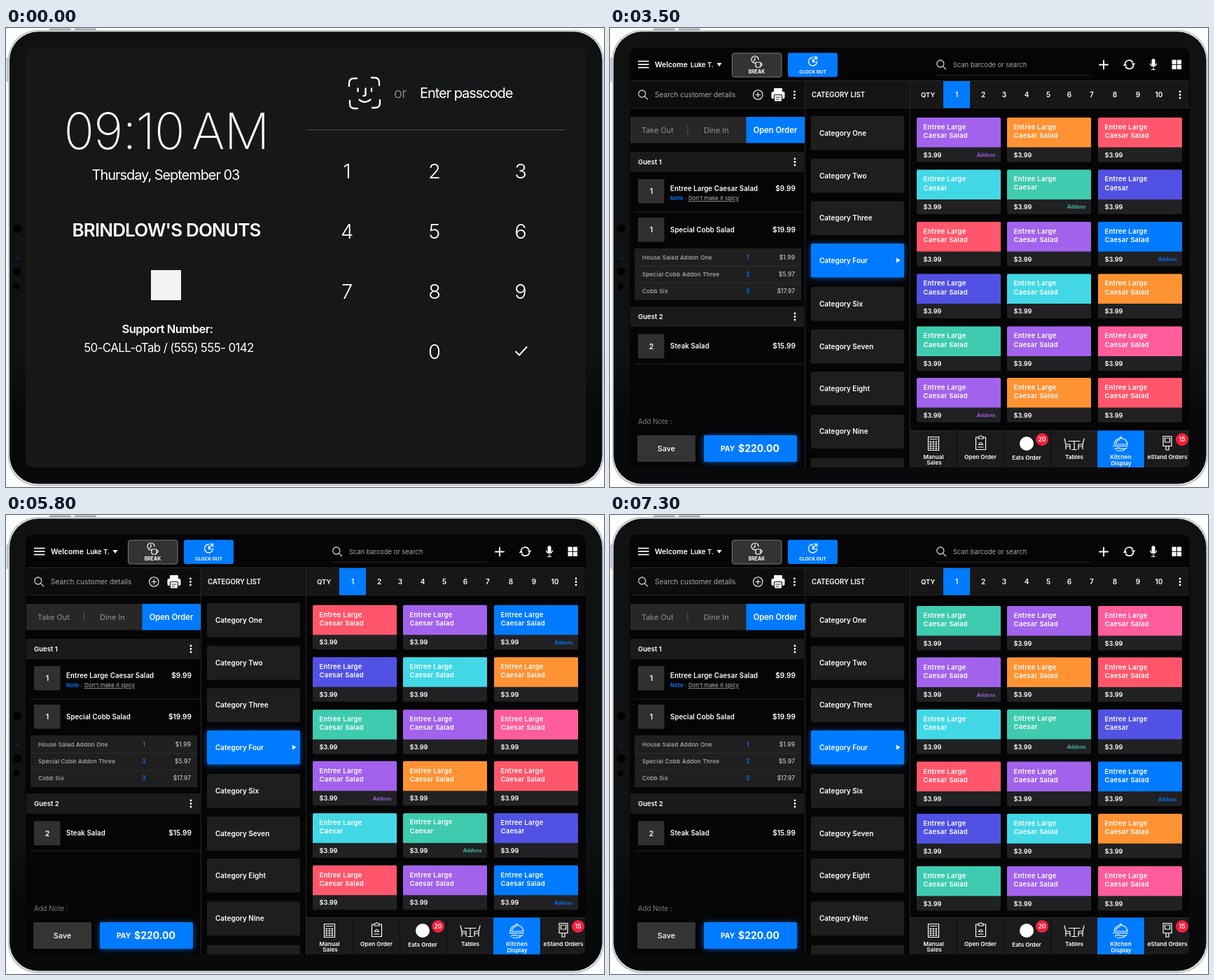
Recreate the animation shown at these times as an HTML page. Size 854x656 px, loop 8000 ms.

```html
<!DOCTYPE html>
<html lang="en">
<head>
<meta charset="utf-8">
<title>Point of sale tablet</title>
<style>
  html, body { margin: 0; width: 100%; height: 100%; overflow: hidden; background: #fff; }
  svg { display: block; width: 854px; height: 656px; font-family: Inter, "Open Sans", sans-serif; }
  text { white-space: pre; }
  .glow { filter: drop-shadow(0 1px 5px #007bff99); }
</style>
</head>
<body>
<svg id="stage" viewBox="0 0 854 656"></svg>
<script>
const BLUE = '#007bff', WHITE = '#fff';
const PURPLE = '#a262ec', ORANGE = '#ff9233', RED = '#ff566b', CYAN = '#43d8e6',
      TEAL = '#3ecbb0', INDIGO = '#5152e3', PINK = '#ff5c9b';

// Drawing helpers; text is placed by the middle of its capitals
const text = (x, y, size, weight, str, { fill = WHITE, anchor = 'start', ls = 0, more = '' } = {}) =>
  `<text x="${x}" y="${y + size * 0.364}" font-size="${size}" font-weight="${weight}" fill="${fill}" ` +
  `text-anchor="${anchor}" letter-spacing="${ls}" ${more}>${str}</text>`;
const mid = (x, y, size, weight, str, o) => text(x, y, size, weight, str, { anchor: 'middle', ...o });
const end = (x, y, size, weight, str, o) => text(x, y, size, weight, str, { anchor: 'end', ...o });
const rect = (x, y, w, h, fill, r = 0, more = '') =>
  `<rect x="${x}" y="${y}" width="${w}" height="${h}" rx="${r}" fill="${fill}" ${more}/>`;
const circle = (x, y, r, fill = WHITE) => `<circle cx="${x}" cy="${y}" r="${r}" fill="${fill}"/>`;
const line = (d, width = 1.5, stroke = WHITE) =>
  `<path d="${d}" fill="none" stroke="${stroke}" stroke-width="${width}" stroke-linecap="round" stroke-linejoin="round"/>`;
const shape = (d, fill = WHITE) => `<path d="${d}" fill="${fill}"/>`;
const each = (list, fn) => list.map(fn).join('');
const more = (x, y) => each([-4.5, 0, 4.5], d => circle(x, y + d, 1.4));
const lens = (x, y) => line(`M${x + 4.8} ${y - 1}a5 5 0 1 1-10 0a5 5 0 1 1 10 0M${x + 3.4} ${y + 2.6}l4.2 4.2`, 1.3, '#ccc');

function tablet() {
  return each([62, 98], x => rect(x, 0.5, 31, 4, '#a9adae', 1)) +
    rect(0.5, 42, 4, 35, '#c3c7c8', 1) +
    rect(3, 3, 850.5, 651.5, '#a4a9aa', 42) +
    rect(3.8, 3.8, 848.9, 649.5, '#e3e7e7', 41.5) +
    rect(5, 5.3, 846.5, 646.2, 'url(#bezel)', 41) +
    circle(16, 287, 6, '#020203') + circle(16, 348, 6, '#020203') + circle(15, 369, 4.5, '#020203') +
    line('M14 328.5l4 1', 1.5, '#10305c');
}

// Lock screen
const keyX = n => n ? [487, 612, 735][(n - 1) % 3] : 612;
const keyY = n => n ? 204 + 86 * Math.floor((n - 1) / 3) : 462;

function lockScreen() {
  const corners = each([0, 90, 180, 270], a =>
    `<g transform="rotate(${a} 512 93)">${line('M490 83v-4q0-7 7-7h4', 2.3)}</g>`);
  return rect(28, 28, 800, 600, '#161719', 10) +
    mid(229, 146.5, 72, 200, '09:10 AM', { ls: -0.8, more: 'word-spacing="-9"' }) +
    mid(228, 210, 20, 400, 'Thursday, September 03', { ls: -1.05 }) +
    mid(229, 289, 26, 600, "BRINDLOW'S DONUTS", { ls: -0.85 }) +
    rect(207, 346, 43, 43, '#f2f2f2') +
    mid(230.5, 429.5, 16.5, 600, 'Support Number:', { ls: -0.5 }) +
    mid(232.5, 457, 17, 400, '50-CALL-oTab / (555) 555- 0142', { ls: -0.65 }) +
    `<g id="prompt">${corners}` +
    line('M502.5 86.5v4M522 86.5v4M513.5 86.5v8.5q0 2-3 2M504.5 102.5q8 6.5 16 0', 2.3) +
    text(554, 93, 20, 300, 'or', { fill: '#98999b', ls: -0.5 }) +
    text(591, 92.5, 20, 400, 'Enter passcode', { ls: -1.05 }) + '</g>' +
    '<g id="dots"></g>' +
    rect(430, 145, 368.5, 1, '#4b4c4e') +
    '<circle id="press" r="36" fill="#313132"/>' +
    each([1, 2, 3, 4, 5, 6, 7, 8, 9, 0], n => mid(keyX(n), keyY(n), 29, 300, n)) +
    line('M728 462.5l5 5 10.5-11.5', 2);
}

// Order screen
function topBar() {
  return rect(29, 75, 798, 1, '#2a2a2b') +
    each([47.5, 52, 56.5], y => rect(40, y - 0.8, 15.5, 1.7, WHITE)) +
    text(64, 52, 10.4, 600, 'Welcome') + text(115, 52.5, 9.5, 600, 'Luke T.', { ls: -0.1 }) +
    shape('M152.5 50h7l-3.5 5z') +
    rect(174.5, 36, 70.5, 34, '#333334', 3, 'stroke="#7b7b7c"') +
    line('M207 50a5 5 0 1 1 5-5M207 42v3.5l-2 1.5M208 49h7v5q0 2-2 2h-3q-2 0-2-2zM215 50.5q3 0 2 2t-2 1', 1.2) +
    mid(209.5, 62.3, 7, 700, 'BREAK') +
    rect(254, 35.5, 71, 34.5, BLUE, 3) +
    line('M295.5 48a6 6 0 1 1-6-6M289.5 44.5v4h3.5M290 47l5.5-5.5M292 41.5h3.5v3.5', 1.3) +
    mid(289.5, 62.3, 6.5, 700, 'CLOCK OUT') +
    lens(472, 52) + text(490, 52.5, 9.3, 400, 'Scan barcode or search', { fill: '#a9a9aa' }) +
    rect(465, 67, 221, 1, '#252526') +
    line('M699 52.5h12M705 46.5v12', 1.9) +
    line('M735.5 51a6 6 0 0 1 11-2M747.5 53.5a6 6 0 0 1-11 2', 1.7) +
    shape('M744.5 50.5h6l-3 3.5zM732.5 54h6l-3-3.5z') +
    rect(773.5, 44, 5, 10, WHITE, 2.5) + line('M771.5 51a4.7 5 0 0 0 9 0M776 56.5v3M773.5 59.5h5', 1.2) +
    each([0, 1, 2, 3], i => rect(802.5 + i % 2 * 7.3, 45.5 + (i >> 1) * 7.3, 6.2, 6.2, WHITE, 0.5));
}

function secondBar() {
  const printer = rect(234, 86, 12, 5, WHITE, 1) + rect(230.5, 91, 19, 10, WHITE, 2) +
    rect(234.5, 95.5, 11, 9.5, WHITE, 1, 'stroke="#111" stroke-width="1.2"') +
    line('M237 99h6M237 102h4', 1, '#222');
  return rect(29, 76, 249, 38, '#0d0d0e') + rect(279, 76, 149, 38, '#141415') + rect(429, 76, 398, 38, '#171718') +
    rect(29, 114, 798, 1, '#222223') +
    lens(46, 95) + text(64, 95.5, 10.1, 400, 'Search customer details', { fill: '#a9a9aa' }) +
    line('M218 95.5a6.7 6.7 0 1 1-13.4 0a6.7 6.7 0 1 1 13.4 0M208 95.5h6.6M211.3 92.2v6.6', 1.1) +
    printer + more(263.5, 95.5) +
    text(288, 95.5, 9.7, 600, 'CATEGORY LIST') +
    text(444, 95.5, 9.6, 600, 'QTY') +
    rect(476, 76, 38, 38.5, BLUE) +
    each([495, 533, 563, 595, 626, 656, 688, 721, 754, 784], (x, i) => mid(x, 95.5, 10, 600, i + 1)) +
    more(814, 95.5);
}

function orderPanel() {
  const guest = (y, n) => rect(29, y, 248, 29, '#1a1a1b') + text(40, y + 14.5, 9.6, 600, 'Guest ' + n) + more(264, y + 14.5);
  const item = (y, n, name, price, dy = 0) => rect(40, y, 37.5, 34.5, '#303031', 1) +
    mid(59, y + 17.3, 10.5, 600, n) + text(86, y + 17.3 + dy, 9.7, 600, name, { ls: 0.08 }) +
    end(265, y + 17.3 + dy, 10.1, 600, price);
  const addons = [['House Salad Addon One', 1, '$1.99'], ['Special Cobb Addon Three', 3, '$5.97'], ['Cobb Six', 3, '$17.97']];
  return rect(29, 127, 166, 37.5, '#272728') + rect(194.5, 127, 83.5, 37.5, BLUE) +
    text(45, 146, 10.9, 400, 'Take Out', { fill: '#929293' }) + rect(110.5, 139, 1, 13, '#5b5b5c') +
    text(134, 146, 10.9, 400, 'Dine In', { fill: '#929293' }) +
    mid(236, 145.5, 11.2, 600, 'Open Order') +
    guest(177, 1) + item(216, 1, 'Entree Large Caesar Salad', '$9.99', -3.5) +
    text(86, 243.5, 8, 600, 'Note :', { fill: BLUE }) +
    text(112, 243.5, 8, 400, 'Don\'t make it spicy', { fill: '#bcbcbd', more: 'text-decoration="underline"' }) +
    rect(35, 262.5, 243, 1, '#222223') +
    item(271, 1, 'Special Cobb Salad', '$19.99') +
    rect(35, 315, 238, 74, '#1f1f20', 1) + rect(35, 340, 238, 1, '#2d2d2e') + rect(35, 364, 238, 1, '#2d2d2e') +
    each(addons, ([name, n, price], i) => {
      const y = 328.3 + 24 * i;
      return text(46, y, 8.2, 500, name, { fill: '#b4b4b5', ls: 0.22 }) + mid(197, y, 8.3, 600, n, { fill: BLUE }) +
        end(264, y, 8.3, 500, price, { fill: '#c4c4c5', ls: 0.1 });
    }) +
    guest(398, 2) + item(437.5, 2, 'Steak Salad', '$15.99') + rect(35, 479.5, 243, 1, '#222223') +
    text(40, 562, 9.7, 400, 'Add Note :', { fill: '#7d7d7e' }) +
    rect(39, 582, 83, 38, '#343435', 2) + mid(80.5, 601, 10.8, 500, 'Save') +
    rect(134, 582, 133, 38, BLUE, 2, 'class="glow"') +
    text(158, 601, 10.3, 700, 'PAY') + text(183, 601, 14, 700, '$220.00');
}

function categories() {
  const names = ['One', 'Two', 'Three', 'Four', 'Six', 'Seven', 'Eight', 'Nine', ''];
  const tops = [126, 187, 247.5, 308, 370, 431, 491, 552.5, 614.5];
  return each(names, (name, i) => {
    const on = name === 'Four';
    return rect(287, tops[i], 133, 48.5, on ? BLUE : '#1e1e1f', 2, on ? 'class="glow"' : '') +
      (name && text(299, tops[i] + 24, 10, 600, 'Category ' + name)) +
      (on ? shape('M409 328.5l5.5 3.5-5.5 3.5z') : '');
  });
}

// Five row styles repeat down the list: three colours and the column that has add-ons
const rows = [
  [PURPLE, ORANGE, RED, 0], [CYAN, TEAL, INDIGO, 1], [RED, PURPLE, BLUE, 2],
  [INDIGO, CYAN, ORANGE], [TEAL, PURPLE, PINK]
];
const rowTop = [0, 74.5, 149, 223.5, 298.5];

function tile(x, y, color, short, addons, lift) {
  const o = { ls: 0.25 };
  return rect(x, y, 120, 63.5, '#212123', 2) + shape(`M${x} ${y + 42.5}v-40.5q0-2 2-2h116q2 0 2 2v40.5z`, color) +
    text(x + 9.5, y + 13.5 - lift, 9.5, 600, 'Entree Large', o) +
    text(x + 9.5, y + 25.7 - lift, 9.5, 600, short ? 'Caesar' : 'Caesar Salad', o) +
    text(x + 9.5, y + 53.3, 9.1, 600, '$3.99') +
    (addons ? end(x + 112.5, y + 53.3, 7.2, 600, 'Addons', { fill: color, more: 'font-style="italic"' }) : '');
}

function products() {
  let out = '';
  for (let i = 0; i < 11; i++) {
    const k = i % 5, y = 128 + 372 * Math.floor(i / 5) + rowTop[k];
    out += each([438, 567, 697], (x, c) => tile(x, y, rows[k][c], k === 1, rows[k][3] === c, k === 1 && c === 1 ? 0.8 : 0));
  }
  return `<g clip-path="url(#list)"><g id="products">${out}</g></g>`;
}

function navBar() {
  const label = (x, y, str) => mid(x, y, 8.2, 600, str);
  const badge = (x, n) => circle(x, 588, 9, '#f3203a') + mid(x, 588, 8.5, 600, n);
  let keys = '';
  for (let i = 0; i < 12; i++) keys += rect(456.5 + i % 3 * 4, 590.5 + Math.floor(i / 3) * 3.1, 2.6, 1.9, WHITE);
  return rect(429, 575, 398, 53, '#1b1b1d') + rect(429, 575, 398, 1, '#2b2b2c') +
    each([495, 562, 629, 763], x => rect(x, 576, 1, 52, '#0c0c0d')) +
    rect(696, 575.5, 67, 53, BLUE) +
    line('M454.5 584.5h15v19h-15zM457 587.5h10', 1.2) + keys +
    label(462, 613, 'Manual') + label(463, 621.5, 'Sales') +
    line('M526 585h-3.5v17.5h14v-17.5h-3.5M526 587v-3h2q1.5-3 3 0h2v3zM526 599h7M526.5 595.5q3-6 6 0z', 1.2) +
    label(529, 613, 'Open Order') +
    circle(595, 594, 10) + badge(617, 20) + label(595, 614, 'Eats Order') +
    line('M655 590.5h16M663 590.5v11M659.5 602.5h7M649 587l2 8h6v7M651 595v7M677 587l-2 8h-6v7M675 595v7M651 598h6M669 598h6', 1.2) +
    label(663, 613, 'Tables') +
    line('M720 595q1-8.5 9.5-8.5t9.5 8.5zM718.5 597.5h21M728 586q1.5-4 3 0M723 593q1-4 5-4.5M721 602q4-3 8-1h6M724 604h8l6-4', 1.2) +
    label(729.5, 613.5, 'Kitchen') + label(730, 622, 'Display') +
    line('M790 583.5h12v14h-12zM792.5 586h7v6h-7zM794 597.5v5.5h4v-5.5', 1.2) +
    badge(817, 15) + label(796, 613, 'eStand Orders');
}

const stage = document.getElementById('stage');
stage.innerHTML =
  `<defs><clipPath id="list">${rect(429, 120, 398, 449, WHITE)}</clipPath>` +
  `<clipPath id="screen">${rect(28, 28, 800, 600, WHITE, 10)}</clipPath>` +
  '<linearGradient id="bezel" x2="0" y2="1"><stop offset=".7" stop-color="#101112"/>' +
  '<stop offset=".85" stop-color="#08090a"/></linearGradient></defs>' +
  tablet() + `<g id="lock">${lockScreen()}</g>` +
  `<g id="app" clip-path="url(#screen)">${rect(28, 28, 800, 600, '#050506')}` +
  topBar() + secondBar() + orderPanel() + categories() +
  rect(278, 76, 1, 552, '#262627') + rect(428, 76, 1, 552, '#262627') +
  products() + navBar() + '</g>';

const get = id => document.getElementById(id);
const show = (id, on) => get(id).setAttribute('display', on ? 'inline' : 'none');
// Number of half-second steps begun since a start time
const steps = (t, start, max) => t < start ? 0 : Math.min(max, 1 + Math.floor((t - start) / 500));
const passcode = [5, 4, 6, 8];

function draw(now) {
  const t = now % 8000, locked = t < 3500;
  const typed = steps(t, 1000, 4);
  show('lock', locked);
  show('app', !locked);
  show('prompt', !typed);
  show('press', typed);
  if (typed) {
    const key = passcode[typed - 1];
    get('press').setAttribute('transform', `translate(${keyX(key)} ${keyY(key)})`);
  }
  get('dots').innerHTML = each(passcode.slice(0, typed), (_, i) => circle(615.3 + (i - (typed - 1) / 2) * 26.7, 93.5, 8));
  get('products').setAttribute('transform', `translate(0 ${-49.4 * steps(t, 4800, 6)})`);
  requestAnimationFrame(draw);
}
draw(performance.now());
</script>
</body>
</html>
```
